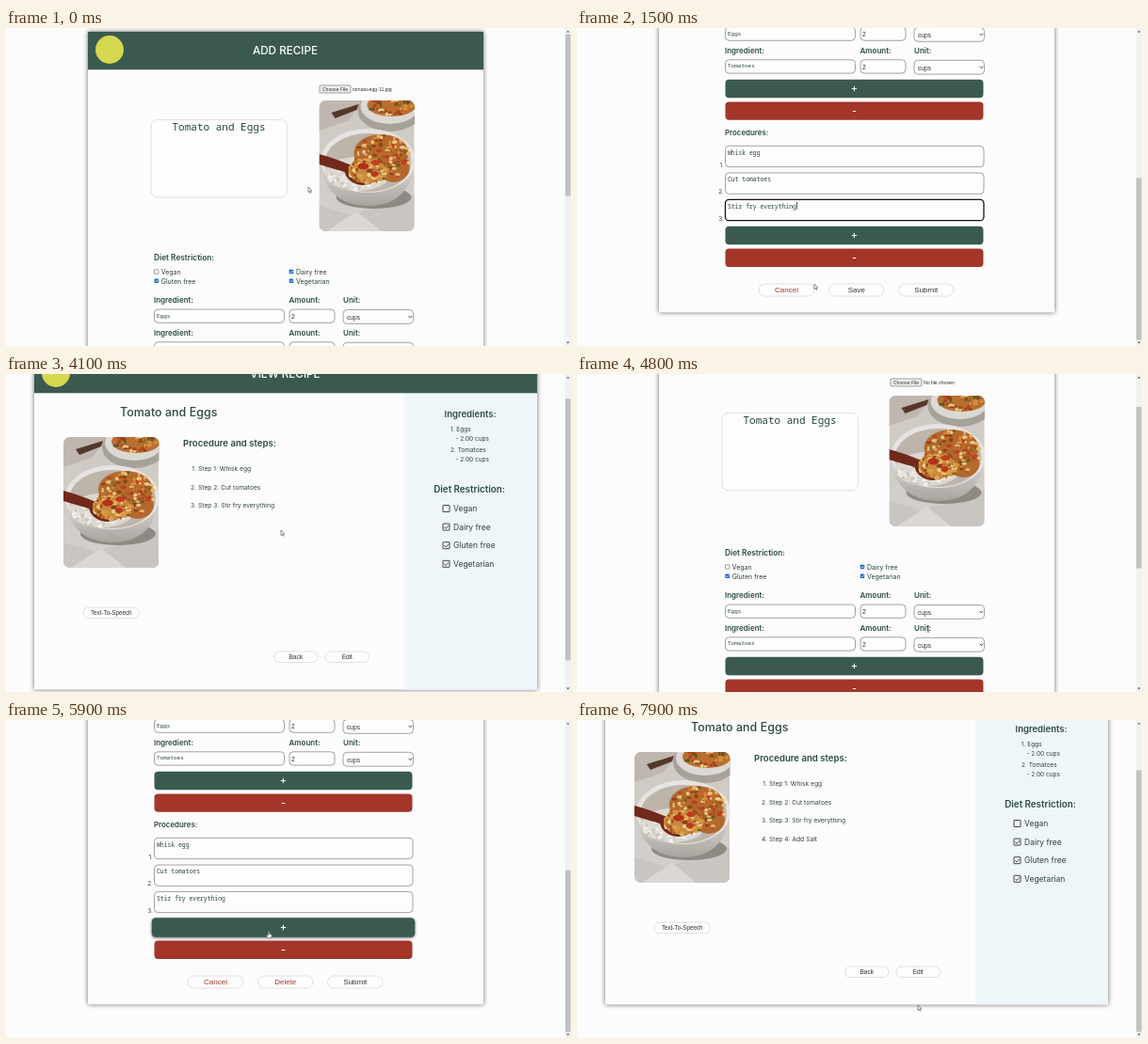
Animation, 600 px wide and 338 px high, one loop 8 s. Source, as an HTML page:

```html
<!DOCTYPE html>
<html lang="en">
<head>
<meta charset="utf-8">
<title>Recipe editor</title>
<style>
html, body { margin: 0; width: 100%; height: 100%; overflow: hidden; background: #fcfcfd; }
svg { display: block; }
text { font-family: Inter, "Open Sans", sans-serif; fill: #2c443b; }
.head { fill: #fff; font-weight: 500; }
.bold { font-weight: 600; fill: #2a4c40; }
.title { font-weight: 500; fill: #2a4c40; }
.mono { font-family: "Noto Sans Mono", "DejaVu Sans Mono", monospace; fill: #23463a; }
.ui { font-family: "Liberation Sans", Arial, sans-serif; fill: #333; }
.red { fill: #a33629; }
.white { fill: #fff; }
.page { fill: #fdfcfd; filter: drop-shadow(0 .5px 2.4px #0009); }
.box { fill: #fefdfe; stroke: #8b8b8b; stroke-width: .8; }
.soft { fill: #fefdfe; stroke: #d8d8da; stroke-width: .8; }
.card { fill: #fdfcfd; stroke: #efeff1; stroke-width: 1; }
.card.lit { stroke: #e2e2e4; filter: drop-shadow(0 .5px 1.5px #0006); }
.focus { stroke: #111; stroke-width: 1.3; }
.raised { filter: drop-shadow(0 1px 1.5px #0008); }
.line { fill: none; stroke: #333; stroke-width: .9; }
</style>
</head>
<body>
<svg id="stage" width="600" height="338" viewBox="0 0 600 338"></svg>
<script>
const GREEN = '#3a5a4f', RED = '#a33629', LOOP = 8000;
const PAGE_GROWTH = 28.6, CHAR = 3.84;

// ---- drawing helpers; y of a text is its middle ----
const text = (x, y, s, size, cls = '', anchor = 'start', id = '') =>
  `<text id="${id}" x="${x}" y="${y + size * .36}" font-size="${size}" class="${cls}" text-anchor="${anchor}">${s}</text>`;
const mid = (x, y, s, size, cls) => text(x, y, s, size, cls, 'middle');
const rect = (x, y, w, h, rx, attrs) =>
  `<rect x="${x}" y="${y}" width="${w}" height="${h}" rx="${rx}" ${attrs}/>`;
const ellipse = (x, y, rx, ry, fill) =>
  `<ellipse cx="${x}" cy="${y}" rx="${rx}" ry="${ry}" fill="${fill}"/>`;
const group = (id, x, y, body, attrs = '') =>
  `<g id="${id}" transform="translate(${x} ${y})" ${attrs}>${body}</g>`;
const pill = (x, y, w, h, s, size, cls = '') =>
  rect(x, y, w, h, h / 2, 'class="soft"') + mid(x + w / 2, y + h / 2, s, size, 'ui ' + cls);
const bar = (y, sign, fill, id = '') =>
  `<g id="${id}">${rect(157.5, y, 274, 19.4, 4, `fill="${fill}"`)}${mid(294.5, y + 9.5, sign, 11, 'head')}</g>`;
const header = (x, w, s) =>
  rect(x, 4, w, 40.3, 0, `fill="${GREEN}"`) +
  `<circle cx="${x + 23}" cy="23" r="15" fill="#d6d850"/>` + mid(296.5, 24, s, 11.7, 'head');

function seeded(seed) {
  return () => (seed = (seed * 16807) % 2147483647) / 2147483647;
}
function flecks(seed, n, x, y, rx, ry, colors) {
  const rnd = seeded(seed);
  return Array.from({ length: n }, () => {
    const a = rnd() * 6.283, r = Math.sqrt(rnd());
    return ellipse((x + rx * r * Math.cos(a)).toFixed(1), (y + ry * r * Math.sin(a)).toFixed(1),
      1 + rnd() * 2.2, .9 + rnd() * 1.5, colors[Math.floor(rnd() * colors.length)]);
  }).join('');
}

const FOOD = ['#d98a3c', '#e3b673', '#b8401f', '#ecc98c', '#8f4319', '#c9691f', '#5f5a24', '#a85a22'];
const EGG = ['#e6b765', '#d4953f', '#f0d08c', '#b96b25', '#8f4319', '#dca24c'];
const photo =
  rect(0, 0, 101, 139, 0, 'fill="url(#cloth)"') +
  '<path d="M0 0H48L30 22 0 32Z" fill="#bfb7af"/><path d="M13 13 42 4 40 10 17 19Z" fill="#54382a"/>' +
  ellipse(75, 11, 34, 22, '#a8a19a') + ellipse(75, 6, 31, 19, '#dcd8d3') +
  ellipse(77, 5, 26, 12, '#b8702f') + flecks(11, 45, 77, 5, 24, 11, FOOD) +
  '<path d="M0 112 34 122 101 100V139H0Z" fill="#c9c5c1"/><path d="M8 139 40 118 66 139Z" fill="#dad7d4"/>' +
  ellipse(58, 103, 40, 12, '#8f8983') +
  '<path d="M2 64Q5 111 52 112 98 111 101 64Z" fill="url(#bowl)"/>' +
  ellipse(52, 64, 50, 34, '#e6e3e0') + ellipse(52, 66, 46, 31, '#bdb4aa') +
  ellipse(41, 78, 35, 18, '#dcd7d1') + flecks(5, 70, 36, 82, 29, 13, ['#f3f0ec', '#cdc6be', '#e6e2dd']) +
  ellipse(66, 56, 29, 20, '#b3692c') + ellipse(79, 72, 17, 15, '#b3692c') +
  flecks(23, 130, 68, 60, 29, 23, FOOD) +
  '<path d="M0 57Q15 61 32 68 47 71 66 79 56 93 40 89 29 85 27 76 13 72 0 68Z" fill="#70291a"/>' +
  ellipse(51, 75, 20, 13, '#c78a40') + flecks(41, 80, 51, 75, 20, 13, EGG) +
  ellipse(47, 70, 6, 3.5, '#b5301b') + ellipse(60, 66, 5, 3, '#c03c20') + ellipse(59, 78, 4, 3, '#b93a1f');

const gradient = (id, from, to) =>
  `<linearGradient id="${id}" x2="0" y2="1"><stop stop-color="${from}"/><stop offset="1" stop-color="${to}"/></linearGradient>`;
const defs = `<defs>
  ${gradient('cloth', '#cfc9c3', '#d3cfcb')}${gradient('bowl', '#e0dcd9', '#aaa49f')}
  <g id="photo">${photo}</g>
  <clipPath id="photoClip"><rect width="101.5" height="139" rx="7"/></clipPath>
  <clipPath id="cardClip"><rect width="111" height="144" rx="17"/></clipPath>
</defs>`;
const picture = (x, y) => group('', x, y, '<use href="#photo"/>', 'clip-path="url(#photoClip)"');

// ---- add and edit form ----
function tick(x, y, label, on) {
  const p = `<path d="M${x - 1.2} ${y}l1 1.1 1.6-2.2" fill="none" stroke="#fff" stroke-width=".8"/>`;
  return rect(x - 2.2, y - 2.2, 4.4, 4.4, .4, on ? 'fill="#1766cf"' : 'fill="#fff" stroke="#777" stroke-width=".7"') +
    (on ? p : '') + text(x + 5, y + .3, label, 7);
}
function ingredient(y, name) {
  return text(157, y, 'Ingredient:', 8, 'bold') + text(300.5, y, 'Amount:', 8, 'bold') + text(358, y, 'Unit:', 8, 'bold') +
    rect(157.5, y + 10, 138, 14.3, 4, 'class="box"') + text(160, y + 16.5, name, 6, 'mono') +
    rect(301, y + 10, 48, 14.3, 4, 'class="box"') + text(303, y + 18, '2', 6.7, 'ui') +
    rect(358, y + 10.5, 74.5, 14.8, 4, 'class="box"') + text(362, y + 18.5, 'cups', 6.7, 'ui') +
    `<path class="line" d="M427.6 ${y + 17}l1.8 1.9 1.8-1.9"/>`;
}
const step = (n, y, s, cls = '', id = '') =>
  rect(157.5, y, 274.5, 22.3, 4, `class="box ${cls}"`) + text(160, y + 7, s, 6.4, 'mono', 'start', id) +
  text(156, y + 20, n + '.', 6.5, '', 'end');
const caret = (id, x, y) => rect(x, y, .7, 7.5, 0, `id="${id}" fill="#111"`);

function form(id, edit) {
  const upper =
    rect(154, 97.5, 144.5, 82.5, 7, 'class="soft"') + mid(226, 105, 'Tomato and Eggs', 11, 'mono') +
    rect(333, 61, 33, 8, 1, 'fill="#efefef" stroke="#777" stroke-width=".7"') +
    mid(349.5, 65, 'Choose File', 5.1, 'ui') +
    text(368, 65, edit ? 'No file chosen' : 'tomato-egg-11.jpg', 5.2, 'ui');
  const foot = bar(210.8, '+', GREEN, id + 'Plus') + bar(234.6, '-', RED) +
    pill(193, 272, 59, 13, 'Cancel', 8, 'red') +
    pill(267.5, 272, 58.5, 13, edit ? 'Delete' : 'Save', 8, edit ? 'red' : '') +
    pill(341.5, 272, 58.5, 13, 'Submit', 8);
  const steps =
    bar(54.8, '+', GREEN) + bar(78.4, '-', RED) + text(157, 111.5, 'Procedures:', 7.9, 'bold') +
    step(1, 125.3, 'Whisk egg') + step(2, 154, 'Cut tomatoes') +
    step(3, 182.4, 'Stir fry everything', edit ? '' : 'focus') +
    (edit ? '' : caret('addCaret', 233.4, 185)) +
    (edit ? `<g id="newStep">${step(4, 211, '', 'focus', 'typed')}${caret('editCaret', 160, 214)}</g>` : '') +
    group(id + 'Foot', 0, 0, foot);
  const lower = picture(edit ? 331.5 : 332.5, 77) +
    text(157, 244, 'Diet Restriction:', 8.3, 'bold') +
    tick(159.7, 259, 'Vegan', false) + tick(159.7, 268.7, 'Gluten free', true) +
    tick(303, 259, 'Dairy free', true) + tick(303, 268.7, 'Vegetarian', true) +
    ingredient(289, 'Eggs') + ingredient(323.8, 'Tomatoes') + group('', 0, 300, steps);
  return group(id, 0, 0,
    rect(87, 4, 420, edit ? 600.3 : 598.3, 0, `class="page" id="${id}Page"`) +
    header(87, 420, edit ? 'EDIT RECIPE' : 'ADD RECIPE') + upper + group('', 0, edit ? 2 : 0, lower));
}

// ---- home ----
function dish(x, lines, art) {
  const c = 55.5, extra = lines.length - 1;
  return group('', x, -60,
    rect(0, 0, 111, 144, 17, 'class="card"') +
    `<g clip-path="url(#cardClip)"><svg width="111" height="72" overflow="hidden">${art}</svg></g>` +
    lines.map((s, i) => mid(c, 88 + extra * 1.8 + (i - extra / 2) * 12, s, 8.3)).join('') +
    mid(c, 109 + extra * 4, '45 min', 6) + pill(31, 124.5, 49, 13, 'COOK!', 7.8));
}
function home() {
  const plate = (bg, fill) => rect(0, 0, 111, 72, 0, `fill="${bg}"`) + ellipse(55, 40, 46, 30, fill);
  const corn = plate('#858a92', '#a56a1c') + rect(0, 60, 35, 12, 4, 'fill="#8a5a22"') +
    rect(37, 30, 48, 40, 5, 'fill="#d39a32"') + flecks(8, 40, 60, 64, 45, 8, ['#e6b850', '#7d4814', '#c2842a']);
  const mini = plate('#bdb8a6', '#cdbb78') + ellipse(18, 58, 14, 10, '#6f6a35') + ellipse(93, 59, 13, 10, '#5a5d33') +
    flecks(15, 40, 55, 62, 50, 8, ['#e3ddbb', '#6f7440', '#b3a052', '#4c5230']);
  const quail = plate('#3a322c', '#5f4326') +
    flecks(19, 80, 55, 60, 55, 12, ['#b07a30', '#22281c', '#d6c9ae', '#6e2f20', '#4a5230', '#2c211a']);
  const own = rect(0, 0, 111, 144, 17, 'class="card" id="ownCard"') +
    `<g clip-path="url(#cardClip)"><svg width="111" height="70.5" viewBox="0 37 101 64.1">
      <use href="#photo"/></svg></g>` + mid(55.5, 97, 'Tomato and Eggs', 8.5) +
    rect(30, 124, 51.5, 13, 6.5, 'class="soft" id="check"') +
    `<g id="checkLabel">${mid(55.5, 130.5, 'CHECK', 7.9, 'ui')}</g>`;
  return group('home', 0, 0,
    dish(111, ['One Bowl Jalapeno', 'Cheddar Cornbread'], corn) +
    dish(241, ['Mini frittatas with quinoa'], mini) + dish(371.5, ['Autumn Harvest Quail'], quail) +
    text(256, 115, 'My Recipes', 11.7, 'bold') +
    '<path d="M328.5 111 331.5 115 328.5 119" fill="none" stroke="#23463a" stroke-width="2.1"/>' +
    rect(111, 133.5, 111, 144, 17, 'class="card"') + rect(371.5, 133.5, 111, 144, 17, 'class="card"') +
    '<path d="M156.5 202.5h20M166.5 192.5v20" stroke="#2f4f45" stroke-width="2.6"/>' +
    group('', 241, 133.5, own));
}

// ---- view ----
function view() {
  const steps = ['Whisk egg', 'Cut tomatoes', 'Stir fry everything', 'Add Salt'].map((s, i) => {
    const y = 124.6 + i * 19.6;
    return `<g id="view${i}">${text(202, y, i + 1 + '.', 6.7, '', 'end')}${text(204, y, `Step ${i + 1}: ${s}`, 6.7)}</g>`;
  }).join('');
  const diet = ['Vegan', 'Dairy free', 'Gluten free', 'Vegetarian'].map((s, i) => {
    const y = 167 + i * 19.6;
    return rect(464, y - 3.5, 7, 7, .3, 'class="line"') + text(475, y, s, 8.5) +
      (i ? `<path class="line" d="M465.4 ${y}l1.7 1.7 3-3.3"/>` : '');
  }).join('');
  const part = (n, s, y) => text(472, y, `${n}. ${s}`, 6.5) + text(477.5, y + 9.5, '- 2.00 cups', 6.5);
  return group('view', 0, 0,
    rect(30, 4, 534, 355.5, 0, 'class="page"') + rect(423, 44, 141, 315.5, 0, 'fill="#eff6fa"') +
    header(30, 534, 'VIEW RECIPE') + text(121, 64.5, 'Tomato and Eggs', 12.5, 'title') + picture(61, 91) +
    text(188, 98, 'Procedure and steps:', 9.6, 'bold') + steps +
    pill(82, 272, 59.5, 11.6, 'Text-To-Speech', 6.3) +
    pill(284.5, 319, 46.5, 11.6, 'Back', 6.5) + pill(339, 319, 46.5, 11.6, 'Edit', 6.5) +
    mid(493, 66.5, 'Ingredients:', 9.5, 'bold') + part(1, 'Eggs', 82.7) + part(2, 'Tomatoes', 105) +
    mid(492, 146, 'Diet Restriction:', 9.8, 'bold') + diet);
}

const scrollbar = rect(593.5, 0, 6.5, 338, 0, 'fill="#f1f1f1"') + rect(594, 6.5, 5.5, 50, 0, 'id="thumb" fill="#c1c1c1"') +
  '<path d="M595.2 4.6h3.2L596.8 2.8ZM595.2 333.6h3.2L596.8 335.4Z" fill="#555"/>';
const pointer = `<g id="pointer" stroke="#444" stroke-width=".6" fill="#fff">
  <path id="arrow" d="M0 0V5.6L1.3 4.4 2.2 6.3 3 5.9 2.2 4.1H3.9Z"/>
  <path id="hand" d="M-.7 .5Q0-.5.7.5V2.8L3.2 3.6V5.4L2.4 7.4H-.8L-2.6 4.4-1.9 3.8-.7 4.8Z"/>
  <path id="beam" d="M-1.2-3.2H1.2M-1.2 3.2H1.2M0-3.2V3.2"/>
</g>`;

document.getElementById('stage').innerHTML =
  defs + form('add', false) + home() + view() + form('edit', true) + scrollbar + pointer;

// ---- motion ----
const $ = id => document.getElementById(id);
const show = (id, on) => $(id).setAttribute('visibility', on ? 'inherit' : 'hidden');
const move = (id, x, y) => $(id).setAttribute('transform', `translate(${x} ${y})`);

// [start, page]
const PAGES = [[0, 'add'], [3000, 'home'], [3700, 'view'], [4800, 'edit'], [7400, 'view']];
// [time, scroll]
const SCROLL = {
  add: [[0, 0], [1300, 300]],
  home: [[0, 139]],
  view: [[3800, 57], [4100, 24], [4250, 0], [4300, 0], [4550, 57]],
  edit: [[4900, 56], [5600, 302]]
};
// [time, x, y]
const PATH = [[0, 321, 169], [1000, 321, 169], [1400, 252, 272], [1800, 252, 272], [2500, 372, 278],
  [3000, 372, 278], [3300, 300, 268], [3700, 300, 268], [4100, 292, 166], [4300, 300, 180], [4600, 364, 267],
  [4800, 373, 271], [5300, 373, 271], [5800, 279, 224.5], [6700, 279, 224.5], [7100, 369, 303], [7400, 366, 304],
  [7900, 362, 303]];
// [start, shape]
const SHAPES = [[0, 'arrow'], [2400, 'hand'], [3000, 'arrow'], [3300, 'hand'], [3700, 'arrow'], [4600, 'hand'],
  [4800, 'beam'], [5000, 'arrow'], [5700, 'hand'], [6000, 'beam'], [6800, 'arrow'], [7050, 'hand'], [7400, 'arrow']];

const current = (list, t) => list.filter(k => k[0] <= t).pop()[1];
function sample(keys, t) {
  const i = keys.findIndex(k => k[0] > t);
  if (i === 0) return keys[0].slice(1);
  if (i < 0) return keys[keys.length - 1].slice(1);
  const a = keys[i - 1], b = keys[i], p = (t - a[0]) / (b[0] - a[0]);
  const e = p * p * (3 - 2 * p);
  return a.slice(1).map((v, n) => v + (b[n + 1] - v) * e);
}

function draw(now) {
  const t = Math.floor((now % LOOP) / 100) * 100;
  const page = current(PAGES, t), scroll = sample(SCROLL[page], t)[0];
  for (const id of ['add', 'home', 'view', 'edit']) show(id, id === page);
  move(page, 0, page === 'home' ? 139 - scroll : -scroll);

  const grown = t >= 6000;
  const height = { add: 638, home: 477, view: 395, edit: 640 + (grown ? PAGE_GROWTH : 0) }[page];
  $('thumb').setAttribute('y', 6.5 + 325 * scroll / height);
  $('thumb').setAttribute('height', 325 * 338 / height);

  const lit = page === 'home' && t >= 3300;
  $('ownCard').classList.toggle('lit', lit);
  $('check').setAttribute('style', lit ? 'fill:#2c6a16;stroke:#2c6a16' : '');
  $('checkLabel').firstChild.classList.toggle('white', lit);

  const blink = Math.floor(t / 500) % 2 === 1;
  show('addCaret', blink);
  const count = Math.max(0, Math.min(8, Math.floor((t - 6300) / 75)));
  show('newStep', grown);
  $('typed').textContent = 'Add Salt'.slice(0, count);
  $('editCaret').setAttribute('x', 160 + count * CHAR);
  show('editCaret', grown && (blink || (t > 6300 && t < 7000)));
  move('editFoot', 0, grown ? PAGE_GROWTH : 0);
  $('editPage').setAttribute('height', 600.3 + (grown ? PAGE_GROWTH : 0));
  const raised = t >= 5700 && !grown;
  $('editPlus').classList.toggle('raised', raised);
  $('editPlus').setAttribute('transform', raised ? 'translate(294.5 220.5) scale(1.02 1.06) translate(-294.5 -220.5)' : '');
  show('view3', t >= 7400);

  const [x, y] = sample(PATH, t), shape = current(SHAPES, t);
  move('pointer', x, y);
  for (const id of ['arrow', 'hand', 'beam']) show(id, id === shape);
}

const start = performance.now();
function frame() {
  draw(performance.now() - start);
  requestAnimationFrame(frame);
}
frame();
</script>
</body>
</html>
```
